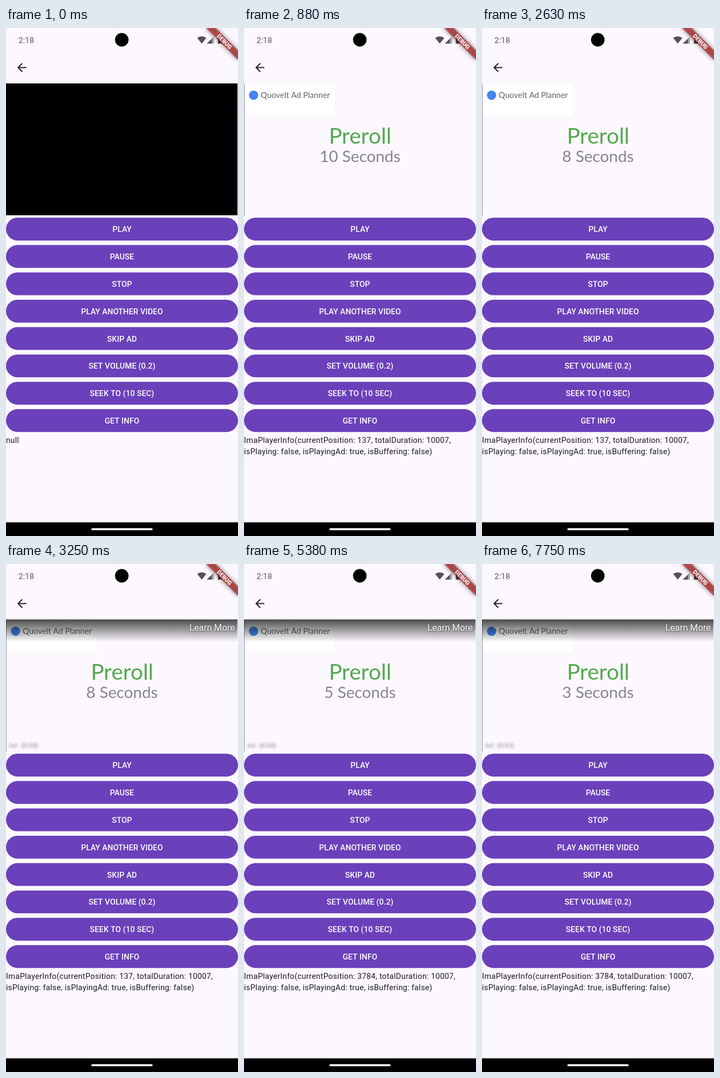
An HTML page with a canvas for the animation above (8000 ms loop, 432 px wide and 944 px high).

```html
<!DOCTYPE html>
<html lang="en">
<head>
<meta charset="utf-8">
<title>Video player demo</title>
<style>
html, body { margin: 0; width: 100%; height: 100%; overflow: hidden; background: #fcf8fe; }
canvas { display: block; width: 432px; height: 944px; }
</style>
</head>
<body>
<canvas id="stage"></canvas>
<script>
const W = 432, H = 944, LOOP = 8000;
const canvas = document.getElementById('stage');
const dpr = window.devicePixelRatio || 1;
canvas.width = W * dpr;
canvas.height = H * dpr;
const ctx = canvas.getContext('2d');

const BG = '#fcf8fe', PURPLE = '#6b40bb', INK = '#1d1b20';
const ROBOTO = 'Roboto, sans-serif', LATO = 'Lato, sans-serif';
const LABELS = ['PLAY', 'PAUSE', 'STOP', 'PLAY ANOTHER VIDEO', 'SKIP AD',
  'SET VOLUME (0.2)', 'SEEK TO (10 SEC)', 'GET INFO'];
const VIDEO = { x: 0, y: 103, w: 431, h: 245 };

const AD_START = 270;        // loop time at which ad playback is at zero
const OVERLAY_AT = 2750;
const TAPS = [137, 3784];    // ad positions when GET INFO is tapped

function rect(x, y, w, h, fill) {
  ctx.fillStyle = fill;
  ctx.fillRect(x, y, w, h);
}

function pill(x, y, w, h, fill) {
  ctx.fillStyle = fill;
  ctx.beginPath();
  ctx.roundRect(x, y, w, h, h / 2);
  ctx.fill();
}

function disc(x, y, r, fill) {
  ctx.fillStyle = fill;
  ctx.beginPath();
  ctx.arc(x, y, r, 0, Math.PI * 2);
  ctx.fill();
}

function poly(fill, ...pts) {
  ctx.fillStyle = fill;
  ctx.beginPath();
  pts.forEach(([x, y]) => ctx.lineTo(x, y));
  ctx.fill();
}

function text(str, x, y, font, fill, align = 'left', spacing = 0) {
  ctx.font = font;
  ctx.fillStyle = fill;
  ctx.textAlign = align;
  ctx.letterSpacing = spacing + 'px';
  ctx.fillText(str, x, y);
}

function shadow(color, blur, x = 0, y = 0) {
  ctx.shadowColor = color;
  ctx.shadowBlur = blur * dpr;
  ctx.shadowOffsetX = x * dpr;
  ctx.shadowOffsetY = y * dpr;
}

const noShadow = () => shadow('transparent', 0);

function statusBar() {
  text('2:18', 23.2, 28, `15px ${ROBOTO}`, '#5c595e');
  disc(215.6, 21.8, 12.6, '#000');

  // wifi wedge
  ctx.fillStyle = '#565358';
  ctx.beginPath();
  ctx.moveTo(364.5, 29);
  ctx.lineTo(356, 18.6);
  ctx.quadraticCurveTo(364.5, 12.4, 373, 18.6);
  ctx.fill();

  // cell signal
  poly('#a9a6ab', [374, 29], [387.3, 29], [387.3, 15.8]);
  poly('#565358', [374, 29], [383.4, 29], [383.4, 19.7]);

  // battery
  rect(397, 15, 4, 2, '#444146');
  rect(394.5, 16.5, 9, 12.5, '#444146');
}

function debugBanner() {
  ctx.save();
  ctx.translate(W, 0);
  ctx.rotate(Math.PI / 4);
  const off = 42, h = 12.6, far = 2000;
  // only the shadow of this far-away strip lands on the stage
  const d = far / Math.SQRT2;
  shadow('rgba(0,0,0,0.5)', 8, -far, 0);
  rect(-off + d, off - h - d, off * 2, h, '#000');
  noShadow();
  rect(-off, off - h, off * 2, h, 'rgba(183,28,28,0.627)');
  text('DEBUG', 0, off - h / 2 + 3.8, `900 10.7px ${ROBOTO}`, '#fff', 'center');
  ctx.restore();
}

const arrow = new Path2D('M20 11H7.83l5.59-5.59L12 4l-8 8 8 8 1.41-1.41L7.83 13H20z');

function backArrow() {
  ctx.save();
  ctx.translate(16.9, 60.9);
  ctx.scale(1.05, 1.05);
  ctx.fillStyle = INK;
  ctx.fill(arrow);
  ctx.restore();
}

function adOverlay(left) {
  const g = ctx.createLinearGradient(0, VIDEO.y, 0, VIDEO.y + 42);
  g.addColorStop(0, 'rgba(0,0,0,0.7)');
  g.addColorStop(1, 'rgba(0,0,0,0)');
  rect(VIDEO.x, VIDEO.y, VIDEO.w, 42, g);
  shadow('rgba(0,0,0,0.6)', 3, 0.5, 0.5);
  text('Learn More', 341.4, 124.3, `16.8px ${ROBOTO}`, '#fff');
  shadow('rgba(0,0,0,0.7)', 3, 0.5, 0.5);
  text(`Ad : (0:0${left})`, 5, 340.5, `11.8px ${ROBOTO}`, '#fff');
  noShadow();
}

function video(t) {
  if (t < 130) {
    rect(VIDEO.x, VIDEO.y, VIDEO.w, VIDEO.h, '#000');
    return;
  }
  const left = 10 - Math.max(0, Math.floor((t - AD_START) / 1000));
  rect(1, 104, 168, 60, '#fff');
  rect(0, VIDEO.y, 1, VIDEO.h, '#8a878d');
  disc(17.8, 124.8, 8.6, '#4285f4');
  text('Quovelt Ad Planner', 31, 130.3, `15px ${LATO}`, '#5f6368');
  text('Preroll', 216.2, 214.6, `41px ${LATO}`, '#52a950', 'center');
  text(`${left} Seconds`, 216, 249, `29.7px ${LATO}`, '#87858a', 'center');
  if (t >= OVERLAY_AT) adOverlay(left);
}

// Press highlight: quick rise before the tap lands, slow fade after it
function press(t) {
  return TAPS.reduce((sum, pos) => {
    const dt = t - pos - AD_START;
    const a = dt < 0 ? 1 + dt / 120 : 1 - dt / 380;
    return sum + Math.max(0, a);
  }, 0);
}

function buttons(t) {
  LABELS.forEach((label, i) => {
    const mid = 373.7 + i * 50.83;
    pill(0, mid - 21.2, W, 42.4, PURPLE);
    if (label === 'GET INFO') {
      pill(0, mid - 21.2, W, 42.4, `rgba(255,255,255,${0.13 * press(t)})`);
    }
    text(label, 216, mid + 5.5, `500 14.7px ${ROBOTO}`, '#fff', 'center', 0.1);
  });
}

function info(t) {
  const pos = TAPS.filter(p => t >= p + AD_START).pop();
  const lines = pos === undefined ? ['null'] : [
    `ImaPlayerInfo(currentPosition: ${pos}, totalDuration: 10007,`,
    'isPlaying: false, isPlayingAd: true, isBuffering: false)'
  ];
  lines.forEach((s, i) =>
    text(s, 0, 771 + i * 21, `14.7px ${ROBOTO}`, INK, 'left', 0.2625));
}

function draw(t) {
  ctx.setTransform(dpr, 0, 0, dpr, 0, 0);
  rect(0, 0, W, H, BG);
  statusBar();
  backArrow();
  video(t);
  buttons(t);
  info(t);
  debugBanner();
  rect(0, 918.6, W, H - 918.6, '#000');
  pill(159, 929.4, 114, 3.8, '#fff');
}

function snap(t) {
  const at = k => Math.round(k * 12.5) * 10;
  const k = Math.floor(t / 125);
  return at(at(k) > t ? k - 1 : k);
}

const start = performance.now();
function tick() {
  draw(snap((performance.now() - start) % LOOP));
  requestAnimationFrame(tick);
}
tick();
</script>
</body>
</html>
```
